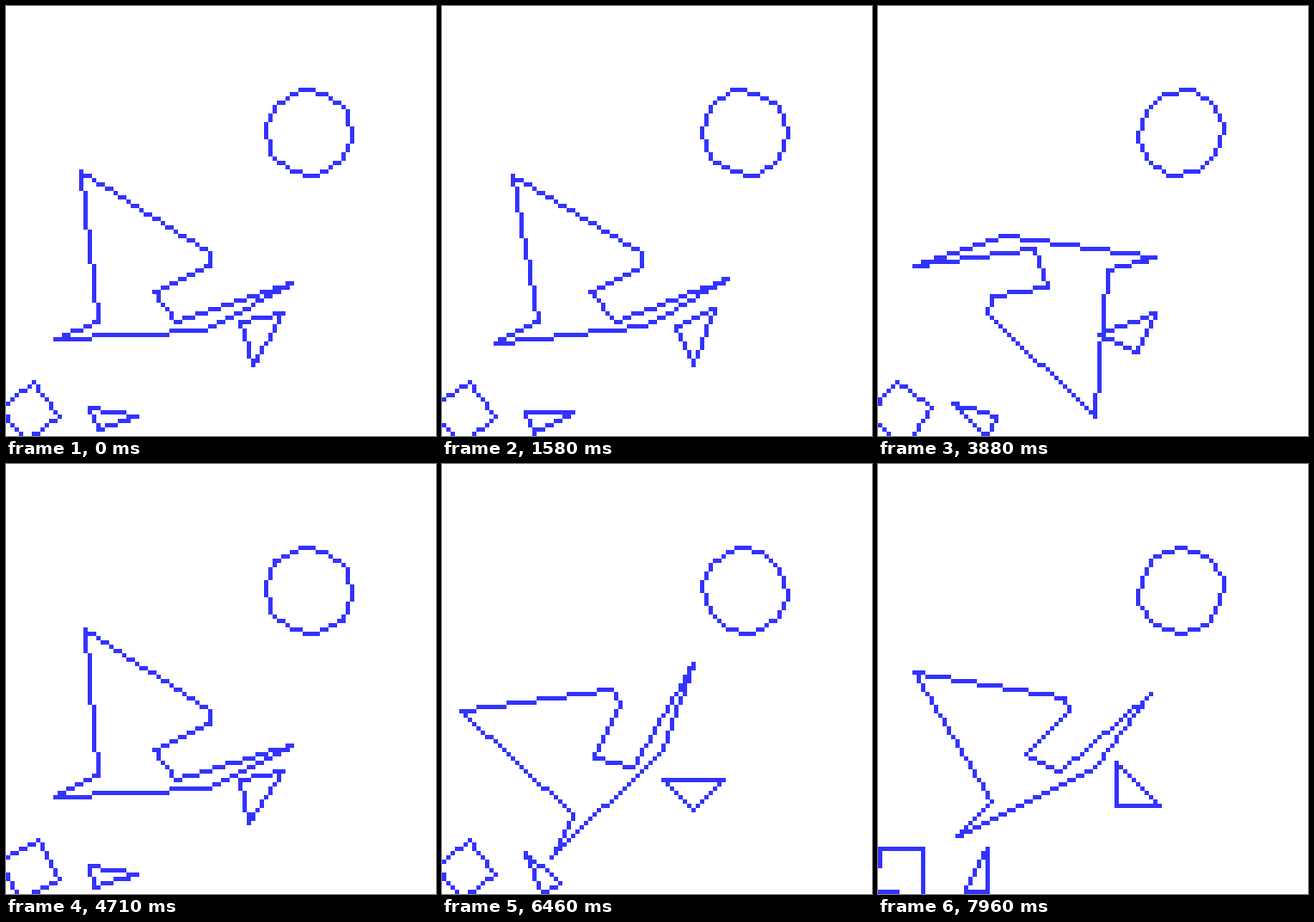
Recreate the animation shown at these times as an HTML page with a canvas. Size 500x500 px, loop 8000 ms.

```html
<!DOCTYPE html>
<html lang="en">
<head>
<meta charset="utf-8">
<title>Spinning polygons</title>
<style>
  html, body { margin: 0; width: 100%; height: 100%; overflow: hidden; background: #fff; }
  canvas { display: block; width: 100%; height: 100%; image-rendering: pixelated; }
</style>
</head>
<body>
<canvas id="stage" width="100" height="100"></canvas>
<script>
const LOOP = 8000, FPS = 24;
const ctx = document.getElementById('stage').getContext('2d');

const regular = (n, radius, degrees) => Array.from({ length: n }, (_, i) => {
  const a = degrees * Math.PI / 180 + i * 2 * Math.PI / n;
  return [radius * Math.cos(a), radius * Math.sin(a)];
});

// Points are relative to the centre each shape turns around.
const shapes = [
  { x: 70, y: 29, points: regular(10, 10, 4.25) },
  { x: 4.95, y: 94.05, points: regular(4, 7.55, 11) },
  { x: 58.3, y: 75.67, points: [[-4.06, -2.38], [5.61, -4.91], [-1.53, 7.29]] },
  { x: 23.3, y: 95.6, points: [[6.9, -0.45], [-2.75, 2.6], [-4.05, -2.45]] },
  { x: 36.5, y: 65, points: [
    [-19.4, -27], [-15.4, 7.7], [-25.5, 12.1], [9.9, 10], [29.2, -0.6],
    [2.7, 8.2], [-2.8, 1.1], [10.2, -4.7], [10.2, -7.8]
  ] }
];

// Stepped line on the coarse grid; ties stay with the starting side.
function line([x0, y0], [x1, y1]) {
  const dx = x1 - x0, dy = y1 - y0;
  const n = Math.max(Math.abs(dx), Math.abs(dy)) || 1;
  const step = (d, i) => Math.sign(d) * Math.ceil(Math.abs(d) * i / n - 0.5);
  for (let i = 0; i <= n; i++) ctx.fillRect(x0 + step(dx, i), y0 + step(dy, i), 1, 1);
}

// The fewer corners a shape has, the faster it turns.
function drawShape({ x, y, points }, seconds) {
  const angle = -36 / points.length * seconds;
  const c = Math.cos(angle), s = Math.sin(angle);
  const corners = points.map(([px, py]) => [
    Math.round(x + px * c - py * s),
    Math.round(y + px * s + py * c)
  ]);
  corners.forEach((p, i) => line(p, corners[(i + 1) % corners.length]));
}

// Ticks land on the nearest hundredth of a second.
const tickAt = ms => Math.ceil((Math.floor(ms / 10) + 0.5) * 6 / 25) - 1;

function render(now) {
  const seconds = tickAt(Math.max(0, now) % LOOP) / FPS;
  ctx.fillStyle = '#fff';
  ctx.fillRect(0, 0, 100, 100);
  ctx.fillStyle = '#33f';
  shapes.forEach(shape => drawShape(shape, seconds));
}

const start = performance.now();
function loop() {
  render(performance.now() - start);
  requestAnimationFrame(loop);
}
loop();
</script>
</body>
</html>
```
